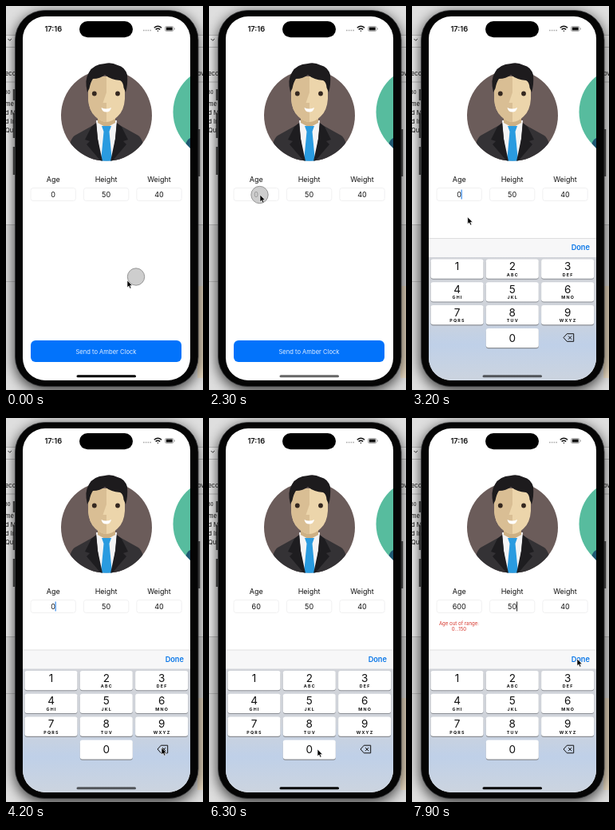
An HTML page that plays this animation: 247x480 px, repeating every 8000 ms.

```html
<!DOCTYPE html>
<html lang="en">
<head>
<meta charset="utf-8">
<style>
  html, body { margin: 0; width: 100%; height: 100%; overflow: hidden; background: #d2d2d2; }
  svg { display: block; width: 247px; height: 480px; font-family: Inter, Roboto, sans-serif; }
  text { text-anchor: middle; dominant-baseline: central; fill: #111; font-size: 9px; }
  .field { fill: #fff; stroke: #ececee; stroke-width: .8; }
  .digit { font-size: 13.5px; }
  .letters { font-size: 5.3px; font-weight: 700; letter-spacing: 1.2px; }
  .error { font-size: 6.1px; fill: #d6352b; }
  .behind text { text-anchor: start; font-size: 7.5px; }
</style>
</head>
<body>
<svg viewBox="0 0 247 480">
  <defs>
    <clipPath id="screen"><rect x="21" y="13" width="210" height="455" rx="28"/></clipPath>
    <clipPath id="portrait"><path d="M60 60H192V136.800H183A57 57 0 0 1 69 136.800H60Z"/></clipPath>
    <linearGradient id="glass" gradientUnits="userSpaceOnUse" x1="0" y1="290" x2="0" y2="468">
      <stop offset="0" stop-color="#d2d4d9"/>
      <stop offset=".5" stop-color="#cfd3da"/>
      <stop offset=".75" stop-color="#bfd0e8"/>
      <stop offset="1" stop-color="#ccd4df"/>
    </linearGradient>
    <filter id="blur" x="-20%" y="-10%" width="140%" height="120%"><feGaussianBlur stdDeviation="8"/></filter>
  </defs>

  <g class="behind">
    <rect width="247" height="480" fill="#dedede"/>
    <path d="M0 37H247V273H0Z" fill="#f0f0f0"/>
    <path d="M0 36.500H247M0 51.500H247M0 95H247M0 273.500H247M0 344.500H12" stroke="#bbb" fill="none"/>
    <path d="M240 350h7v115h-7z" fill="#eadbc2"/>
    <path d="M2.500 41l2.200 2.200 2.200-2.200" stroke="#333" fill="none"/>
    <text x="-1" y="84">eco</text><text x="-2" y="107.500" style="font-size:6px">80</text>
    <text x="-1" y="122">me</text><text x="-1" y="133">d M</text>
    <text x="-1" y="144">d In</text><text x="-1" y="155">Qu</text>
    <text x="240" y="84">ov</text>
  </g>

  <rect x="10" y="8" width="232" height="474" rx="40" opacity=".7" filter="url(#blur)"/>
  <path d="M10 104v14M10 134v31M10 176v35M242 154v59" stroke="#333" stroke-width="2.500"/>
  <rect x="11.500" y="5.500" width="229.500" height="470" rx="37" fill="#050505" stroke="#333436" stroke-width=".8"/>

  <g clip-path="url(#screen)">
    <rect x="20" y="12" width="212" height="457" fill="#fff"/>
    <rect x="92" y="19" width="67" height="20.200" rx="10.100"/>
    <text x="59.300" y="28.500" style="font-size:9.300px;font-weight:600">17:16</text>
    <path d="M172 30.500h10" stroke="#aaa" stroke-width="1.600" stroke-dasharray="1.600 1.200"/>
    <g fill="none" stroke="#111" stroke-width="1.400">
      <path d="M185.700 27.300q4.700-4 9.400 0M187.600 29.400q2.800-2.300 5.600 0M189.900 31.300h1"/>
      <rect x="199.500" y="25.500" width="10.500" height="6" rx="1.700" stroke="#999" stroke-width=".8"/>
      <path d="M200.700 28.500h8" stroke-width="3.800"/>
      <path d="M211.300 27.500v2" stroke="#999" stroke-width=".9"/>
    </g>

    <!-- Portraits -->
    <circle cx="126" cy="136.800" r="57" fill="#6b5c5a"/>
    <g clip-path="url(#portrait)">
      <path d="M76 193Q79 167 86 162L113 147H139L166 162Q173 167 176 193Z" fill="#343235"/>
      <path d="M113 143H139L137 166L133 194H119L115 166Z" fill="#f4f4f5"/>
      <path d="M115 132H137V146L126 152L115 146Z" fill="#cdb084"/>
      <path d="M120 150H132L129.500 157L133 194H119L122.500 157Z" fill="#2a9be0"/>
      <path d="M113 146L107 151L99 167L105 169L101 173L119 194H121L115 166ZM139 146L145 151L153 167L147 169L151 173L133 194H131L137 166Z" fill="#1e1d20"/>
      <path d="M103 88H149V116Q148 131 140 138Q133 145 126 145T112 138Q104 131 103 116Z" fill="#ecd5ab"/>
      <path d="M103 88H126V145Q119 145 112 138Q104 131 103 116Z" fill="#d9be94"/>
      <path d="M126 108V121H121.500Z" fill="#ecd5ab"/>
      <path d="M102 108Q98 92 104 83Q109 73 124 72Q132 70 140 74Q149 76 152 86Q153 98 150 108L147.500 102Q147 95 143 93Q131 92 124 86Q118 91 109 91Q106 95 104.500 103Z" fill="#1d1b1d"/>
      <circle cx="110.800" cy="109.500" r="2.900" fill="#352820"/><circle cx="140" cy="109.500" r="2.900" fill="#352820"/>
      <path d="M119.500 127Q125.500 130 132 127Q131 132.500 125.700 132.500T119.500 127Z" fill="#fff"/>
    </g>
    <circle cx="266.500" cy="132.500" r="57" fill="#57bc9e"/>
    <path d="M231 165Q227 167 225.500 172L231 178Z" fill="#1f5872"/>

    <g id="form"></g>
    <g id="error">
      <text class="error" x="59" y="256">Age out of range:</text>
      <text class="error" x="59" y="263">0...150</text>
    </g>
    <rect id="caret" y="229.500" width="1.100" height="12"/>
    <rect x="31" y="418" width="189" height="27" rx="6" fill="#0273fb"/>
    <text x="125.500" y="432" style="font-size:7.600px;fill:#e2efff">Send to Amber Clock</text>

    <rect id="backdrop" x="20" width="212" height="180" fill="url(#glass)"/>
    <g id="keyboard">
      <rect x="20" y="290" width="212" height="23.500" fill="#f7f7f8"/>
      <path d="M20 290H232" stroke="#d8d8da" stroke-width=".8"/>
      <text x="211.300" y="301" style="font-size:9.200px;font-weight:600;fill:#0876e8">Done</text>
      <g id="keys"></g>
      <path d="M190 414l4.300-4.800h8.400v9.600h-8.400zM196 412l4.200 4.200m0-4.200l-4.200 4.200" fill="none" stroke="#111" stroke-linejoin="round"/>
    </g>
    <rect id="home" x="88.500" y="461.300" width="74.500" height="3" rx="1.500"/>
  </g>

  <circle id="touch" r="10.700" fill="#bdbdbd" fill-opacity=".75" stroke="#858585" stroke-width=".8"/>
  <path id="pointer" d="M0 0V8.800L2 7L3.500 10.200L5 9.500L3.600 6.400H6.300Z" stroke="#fff" stroke-width=".6"/>
</svg>

<script>
const LOOP = 8000;
const $ = id => document.getElementById(id);

$('form').innerHTML = [['Age', 0], ['Height', 50], ['Weight', 40]].map(([label, value], i) => {
  const x = 59.2 + i * 66.4;
  return `<text x="${x}" y="216.5">${label}</text>
    <rect class="field" x="${x - 28.2}" y="227.5" width="56.4" height="16" rx="3"/>
    <text id="${label}" x="${x}" y="235.6">${value}</text>`;
}).join('');

const letters = ['', 'ABC', 'DEF', 'GHI', 'JKL', 'MNO', 'PQRS', 'TUV', 'WXYZ'];
function key(digit, col, row, sub) {
  const x = 23.5 + col * 69.3, y = 316 + row * 28.8, mid = x + 33;
  return `<rect x="${x}" y="${y + 1}" width="66" height="24.3" rx="3" fill="#8c8f95"/>
    <rect id="key${digit}" x="${x}" y="${y}" width="66" height="24.2" rx="3" fill="#fff"/>
    <text class="digit" x="${mid}" y="${y + (digit ? 8.6 : 11.8)}">${digit}</text>
    <text class="letters" x="${mid + .5}" y="${y + 19}">${sub}</text>`;
}
$('keys').innerHTML = letters.map((sub, i) => key(i + 1, i % 3, i / 3 | 0, sub)).join('') + key(0, 1, 3, '');

// Pointer stops: time, x, y
const stops = [
  [0, 152, 343], [100, 150, 340], [900, 92, 262], [1300, 64, 237], [2500, 64, 236], [2850, 64, 256],
  [3100, 64, 257], [3900, 195, 412], [4500, 195, 412], [4800, 198, 358], [4950, 198, 358],
  [5300, 136, 414], [6450, 136, 414], [6800, 143, 390], [6950, 143, 390],
  [7350, 128, 238], [7500, 128, 238], [7850, 207, 301], [LOOP, 207, 301]
];
// Age field contents: time, text
const entries = [[0, '0'], [2700, '0'], [4500, ''], [4850, '6'], [5400, '60'], [6400, '600']];
const HEIGHT_FOCUS = 7400;

const within = (t, from, to) => t >= from && t < to;
const show = (id, on) => $(id).style.display = on ? '' : 'none';
const ramp = (t, from, length) => Math.min(1, Math.max(0, (t - from) / length));

function pointerAt(t) {
  const i = stops.findIndex(s => s[0] > t);
  const [t0, x0, y0] = stops[i - 1], [t1, x1, y1] = stops[i];
  const u = (t - t0) / (t1 - t0), e = u * u * (3 - 2 * u);
  return [x0 + (x1 - x0) * e, y0 + (y1 - y0) * e];
}

function draw(t) {
  const [x, y] = pointerAt(t);
  $('pointer').setAttribute('transform', `translate(${x} ${y})`);

  const tapAge = within(t, 2150, 2500), tapHeight = within(t, 7350, 7500);
  show('touch', t < 100 || tapAge || tapHeight);
  $('touch').setAttribute('cx', t < 100 ? 163 : tapAge ? 63.5 : x);
  $('touch').setAttribute('cy', t < 100 ? 338.5 : tapAge ? 236 : y);

  const [typedAt, age] = entries.filter(e => e[0] <= t).pop();
  $('Age').textContent = age;
  show('error', t >= 6400);

  const onHeight = t >= HEIGHT_FOCUS;
  const focusedAt = onHeight ? HEIGHT_FOCUS : typedAt;
  show('caret', t >= 2700 && (t - focusedAt) % 1000 < 650);
  $('caret').setAttribute('x', onHeight ? 131 : 58.7 + age.length * 2.9);
  $('caret').setAttribute('fill', t < 6400 ? '#2580e8' : '#333');

  // The home bar dims while the screen is idle
  $('home').setAttribute('opacity', 1 - .4 * (ramp(t, 1450, 200) - ramp(t, 4500, 200)));

  // Critically damped spring
  const s = Math.max(0, t - 2740) * .0175;
  const drop = 178 * (1 + s) * Math.exp(-s);
  $('keyboard').setAttribute('transform', `translate(0 ${drop})`);
  $('backdrop').setAttribute('y', 290 + drop);

  const pressed = '#a4c0e0';
  $('key6').setAttribute('fill', within(t, 4800, 4950) ? pressed : '#fff');
  $('key0').setAttribute('fill', within(t, 5350, 5500) || within(t, 6350, 6500) ? pressed : '#fff');
}

function tick() {
  draw(performance.now() % LOOP);
  requestAnimationFrame(tick);
}
tick();
</script>
</body>
</html>
```
